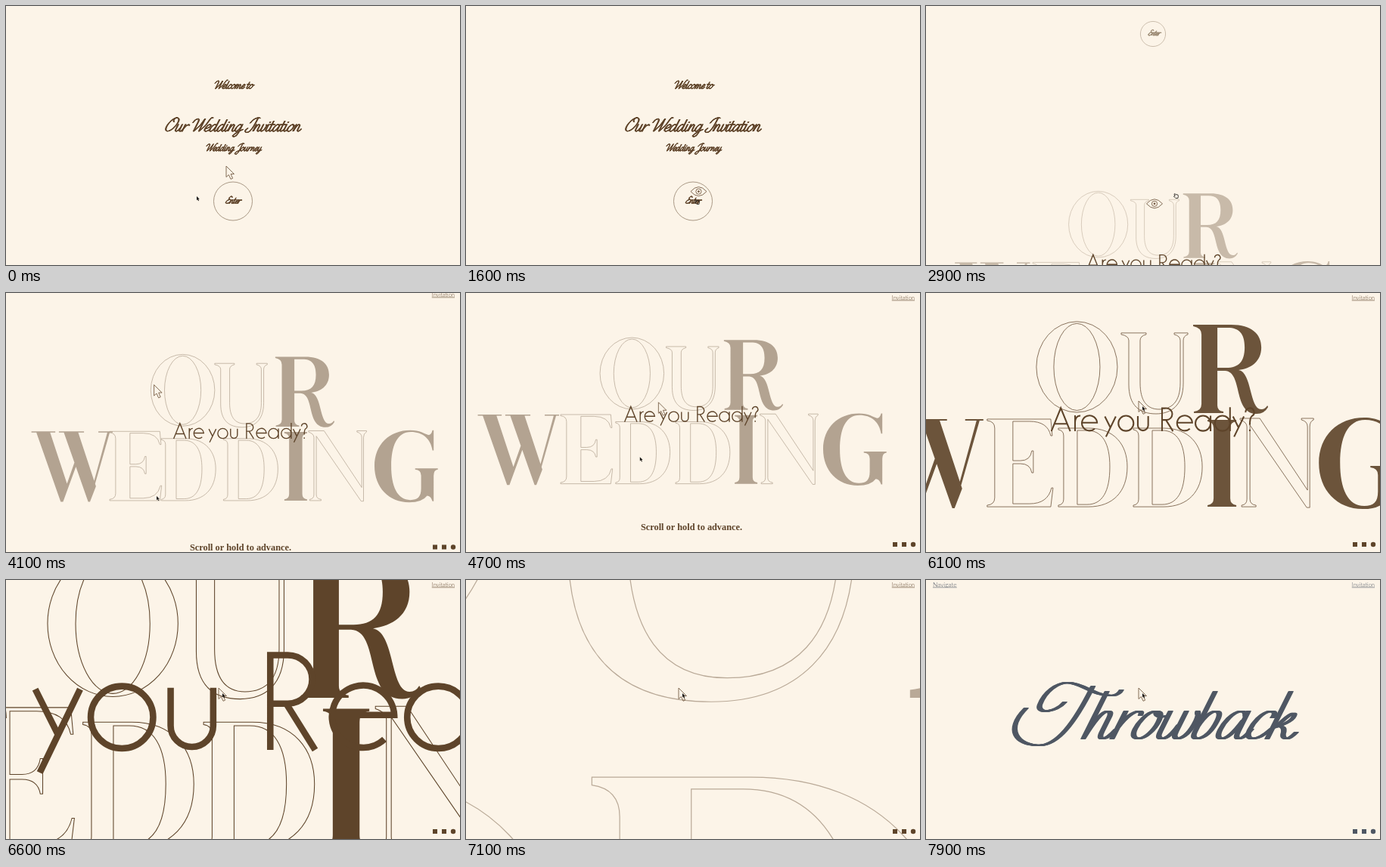
Write an HTML page with a canvas that moves like this. It is 600 px wide and 343 px high and loops after 8 s.

```html
<!DOCTYPE html>
<html lang="en">
<head>
<meta charset="utf-8">
<title>Wedding invitation</title>
<style>
html, body { margin: 0; width: 100%; height: 100%; overflow: hidden; background: #fcf4e8; }
canvas { display: block; width: 600px; height: 343px; }
</style>
</head>
<body>
<canvas id="stage" role="img" aria-label="Our Wedding Invitation"></canvas>
<script>
const LOOP = 8000;
const PAPER = [252, 244, 232], BROWN = [94, 68, 42], SLATE = [79, 87, 99], INK = [25, 22, 20];
const canvas = document.getElementById('stage'), ctx = canvas.getContext('2d');
const dpr = window.devicePixelRatio || 1;
canvas.width = 600 * dpr;
canvas.height = 343 * dpr;

// Script alphabet as upright pen strokes: advance, path. The pen and slant are added when drawn.
const hook = 'Q2 0 8 0Q14 0 20-12';
const cup = 'M2-36V-9Q2 0 9 0Q18 0 22-18';
const bowl = 'M24-30Q22-36 16-36C4-36 0-20 0-12C0-4 3 0 8 0Q18 0 24-24';
const foot = 'V-9Q25 0 31 0Q37 0 41-12';
const hump = 'V0Q6-36 16-36Q22-36 22-28V-9Q22 0 28 0Q34 0 39-12';
const round = 'C4-36 0-20 0-12C0-4 4 0 10 0Q20 0 28-13';
const pen = {
  ' ': [18, ''],
  a: [39, bowl + 'M25-36' + foot],
  b: [34, 'M2-62V-9Q2 0 10 0Q24-2 24-24Q24-36 16-36Q6-36 2-16'],
  c: [27, 'M22-28Q24-36 16-36' + round],
  d: [39, bowl + 'M25-62' + foot],
  e: [27, 'M3-14Q22-18 22-29Q22-36 15-36' + round],
  g: [38, bowl + 'M25-36V8Q24 28 12 28Q2 28 4 20Q12 4 40-10'],
  h: [38, 'M2-62' + hump],
  i: [18, 'M2-36V-9' + hook + 'M4-50v4'],
  k: [36, 'M2-62V0M2-14Q26-22 22-32Q18-38 6-16Q18-18 20-6Q22 0 28 0Q32 0 36-8'],
  l: [18, 'M2-62V-9' + hook],
  m: [52, 'M2-36V0Q6-36 14-36Q19-36 19-28V0Q23-36 31-36Q37-36 37-28V-9Q37 0 43 0Q49 0 54-12'],
  n: [37, 'M2-36' + hump],
  o: [33, 'M16-36C4-36 0-20 0-13C0-4 5 0 11 0C20 0 26-12 26-22C26-32 22-36 16-36Q20-26 34-30'],
  r: [26, 'M2-36V0M2-14Q8-36 20-36Q24-36 24-31'],
  t: [19, 'M2-54V-9' + hook + 'M-8-36H16'],
  u: [38, cup + 'M23-36V-9Q23 0 29 0Q35 0 40-12'],
  v: [27, 'M2-36V-9Q2 0 9 0Q22-2 22-26Q22-32 18-36Q20-28 30-32'],
  w: [46, cup + 'M23-36V-9Q23 0 30 0Q42-2 42-24Q42-32 38-36Q40-28 50-32'],
  y: [36, cup + 'M23-36V8Q22 28 10 28Q0 28 4 20Q12 4 38-10'],
  E: [40, 'M40-60C40-74 16-74 14-56C14-42 24-38 32-38C12-38 0-26 2-12C6 6 30 2 40-14'],
  I: [40, 'M6-44C10-66 30-76 44-70M34-70C34-30 32 6 12 6C-2 6-4-10 6-16'],
  J: [42, 'M4-44C8-66 30-74 46-70M34-70V0C34 34 10 38 6 22C4 8 30-4 44-10'],
  O: [58, 'M36-72C10-70 0-30 6-14C12 4 30 2 42-14C56-34 58-64 42-70C28-76 18-60 30-50'],
  T: [96, 'M76-69C76-20 68 9 44 9C14 9-12-12 2-40M49-48C44-34 20-32 18-45C16-62 26-74 40-74C60-74 84-56 108-57Q116-58 116-64'],
  W: [72, 'M-8-46Q-6-66 10-66Q18-66 18-52V0Q44-30 46-66V0Q72-30 74-66Q76-74 84-72']
};
for (const c in pen) pen[c][1] = new Path2D(pen[c][1]);

// Display capitals, baseline at 0
const oval = (x, y, rx, ry) => `M${x - rx} ${y}a${rx} ${ry} 0 1 1 ${2 * rx} 0a${rx} ${ry} 0 1 1 ${-2 * rx} 0Z`;
const caps = {
  O: oval(53.5, -61, 53.5, 60) + oval(53.5, -61, 30.5, 57.5),
  U: 'M0-106V-104Q10-102 10-96V-38C10-10 24 1 46 1C66 1 82-10 82-40V-96Q82-102 88-104V-106H70V-104Q78-102 78-96V-40C78-14 66-5 50-5C34-5 25-16 25-40V-96Q25-102 33-104V-106Z',
  R: 'M0-117H50C78-117 90-104 90-87C90-68 76-59 60-57C78-54 74-5 90-5Q95-5 98-10L99-8Q94 1 84 1C52 1 66-55 42-56H32V-10Q32-3 40-2V0H1V-2Q11-3 11-12V-104Q11-113 0-115ZM32-113V-60H44C60-60 68-68 68-87C68-106 60-113 46-113Z',
  W: 'M0-116H40V-114H0ZM8-115H31L61-24L53 2H49ZM51-4L77-78L80-72L53 2ZM46-116H88V-114H46ZM54-115H78L108-24L98 2H95ZM97-4L127-114H131L98 2ZM112-116H136V-114H112Z',
  E: 'M0-116H84L86-94H84Q80-113 56-113H34V-61H44Q57-61 59-74H61V-45H59Q57-57 44-57H34V-4H56Q80-4 85-25H87L84 0H0V-2Q10-3 10-12V-104Q10-113 0-114Z',
  D: 'M0-104H40C74-104 91-82 91-53C91-20 72 0 40 0H0V-2Q7-3 7-10V-94Q7-101 0-102ZM25-101V-3H38C58-3 68-20 68-53C68-84 58-101 38-101Z',
  I: 'M0-115H38V-113Q30-112 30-104V-11Q30-3 38-2V0H0V-2Q8-3 8-11V-104Q8-112 0-113Z',
  N: 'M0-117H26L89-22V-106Q89-113 81-115V-117H97V-115Q92-113 92-106V1H88L13-108V-10Q13-3 21-2V0H2V-2Q9-3 9-10V-106Q9-112 0-115Z',
  G: 'M99-84H97C94-104 80-115 61-115C38-115 28-92 28-58C28-24 38-1 60-1C72-1 78-6 78-20V-42Q78-51 68-52V-54H106V-52Q99-51 99-42V1H97Q94-8 88-8Q80 3 58 3C24 3 0-22 0-58C0-94 25-118 60-118C76-118 84-112 90-110Q95-110 97-118H99Z'
};
for (const c in caps) caps[c] = new Path2D(caps[c]);

// letter, x from centre, row, sway while settling
const title = [
  ['O', -154, 0, 3], ['U', -42, 0, -1], ['R', 53, 0, 4],
  ['W', -360, 1, 8], ['E', -219, 1, 0], ['D', -125, 1, -6], ['D', -26, 1, -2],
  ['I', 72, 1, 1], ['N', 115, 1, -1], ['G', 219, 1, 4]
];

// "Are you Ready?" in thin geometric strokes
const ring = x => oval(x, -43, 41, 41);
const sansE = x => `M${x - 41}-46h82A41 41 0 1 0 ${x + 28}-14`;
const sansY = x => `M${x}-80l29 58M${x + 59}-80l-53 110`;
const question = new Path2D(
  'M-549 0L-498-126L-447 0M-532-40H-464M-421 0V-86M-421-50Q-418-84-392-84' + sansE(-343) +
  sansY(-260) + ring(-146) + 'M-82-82V-32A28 28 0 0 0-26-32V-82' +
  'M49 0V-125H72A32 32 0 0 1 72-61H49M70-61L108 0' + sansE(171) +
  ring(270) + 'M311-84V0' + ring(375) + 'M416-130V0' + sansY(432) +
  'M500-102A23 23 0 1 1 534-82Q523-74 523-34M523-10V0');

const arrow = new Path2D('M0 0V14.5L3.4 11.5L6 17.3L8.6 16.2L6.1 10.5H10.5Z');
const hand = new Path2D('M-2-3Q-1-4 0-2.5L3-2Q4 0 3 2.5H0L-2.5 0Q-2-1-.7-.5Z');

// Linear interpolation through [time, value] pairs
function key(t, ...k) {
  if (t <= k[0][0]) return k[0][1];
  for (let i = 1; i < k.length; i++) {
    const [t0, a] = k[i - 1], [t1, b] = k[i];
    if (t < t1) return a + (b - a) * (t - t0) / (t1 - t0);
  }
  return k[k.length - 1][1];
}
const zoom = (t, ...k) => Math.exp(key(t, ...k.map(([a, v]) => [a, Math.log(v)])));
const tint = (color, a) => `rgb(${color.map((v, i) => Math.round(PAPER[i] + (v - PAPER[i]) * a))})`;

function place(x, y, s, draw) {
  ctx.save();
  ctx.translate(x, y);
  ctx.scale(s, s);
  draw();
  ctx.restore();
}

function script(text, x, y, s, color) {
  place(x, y, s, () => {
    ctx.transform(1, 0, -0.5, 1, 0, 0);
    ctx.strokeStyle = color;
    ctx.lineWidth = 2 + 0.15 / s;
    ctx.lineCap = ctx.lineJoin = 'round';
    for (const c of text) {
      const [advance, path] = pen[c];
      ctx.translate(-2.6, 0);
      for (let i = 0; i < 7; i++) {
        ctx.stroke(path);
        ctx.translate(5.2 / 6, 0);
      }
      ctx.translate(advance - 2.6 - 5.2 / 6, 0);
    }
  });
}

function label(text, x, y, font, color, align) {
  ctx.font = font;
  ctx.textAlign = align;
  ctx.fillStyle = color;
  ctx.fillText(text, x, y);
}

function link(text, x, y, size, color, align) {
  label(text, x, y, `300 ${size}px Lato, sans-serif`, color, align);
  const w = ctx.measureText(text).width;
  ctx.fillRect(align === 'right' ? x - w : x, y + 1, w, 0.6);
}

function welcome(t) {
  const a = key(t, [1750, 1], [2450, 0]);
  if (a > 0) {
    const color = tint(BROWN, a);
    script('Welcome to', 274, 109.5, 0.158, color);
    script('Our Wedding Invitation', 208, 166, 0.252, color);
    script('Wedding Journey', 263, 192, 0.14, color);
  }
  const b = key(t, [1700, 1], [2900, 0.6], [3300, 0]);
  if (b <= 0) return;
  const y = key(t, [1650, 258.5], [1800, 250], [2600, 80], [2900, 37]);
  const s = key(t, [1650, 1], [2900, 0.65]);
  ctx.strokeStyle = tint(BROWN, b * 0.65);
  ctx.lineWidth = 0.8;
  ctx.beginPath();
  ctx.arc(300, y, 25.5 * s, 0, 7);
  ctx.stroke();
  script('Enter', 300 - 10.5 * s, y + 3 * s, 0.135 * (0.4 + 0.6 * s), tint(BROWN, b));
}

function journey(t) {
  if (t < 2650 || t > 7300) return;
  const s = zoom(t, [2900, 0.73], [4100, 0.79], [5700, 0.79], [6100, 1], [6600, 1.607], [7000, 4], [7300, 9]);
  const cx = key(t, [2900, 301], [4100, 310], [4800, 296], [5300, 290], [5700, 292], [6100, 300], [6600, 303]);
  const base = key(t, [2650, 480], [2900, 334], [3200, 245], [3600, 195], [4100, 177], [4800, 151],
    [5300, 146], [5700, 148], [6100, 159], [6600, 156]);
  const gone = key(t, [6900, 1], [7250, 0]);
  const sway = key(t, [2900, 0], [4100, 1], [4900, 0]);
  const color = tint(BROWN, gone * key(t, [2650, 0.12], [2900, 0.33], [4100, 0.46], [5700, 0.46], [6100, 0.91], [6600, 1]));

  place(cx, base, s, () => {
    ctx.fillStyle = ctx.strokeStyle = color;
    ctx.lineWidth = (0.4 + 0.4 * Math.min(s, 2)) / s;
    ctx.lineJoin = 'miter';
    for (const [c, x, row, shift] of title) {
      ctx.save();
      ctx.translate(x + shift * sway / s, row * 124);
      if ('RWIG'.includes(c)) ctx.fill(caps[c]);
      else ctx.stroke(caps[c]);
      ctx.restore();
    }
  });

  const size = zoom(t, [5700, 0.161], [6100, 0.244], [6600, 1], [7100, 14]);
  const drop = key(t, [5700, 16], [6100, 24], [6600, 68], [7100, 600]);
  place(cx - key(t, [6100, 0], [6600, 3]), base + drop, size, () => {
    ctx.strokeStyle = tint(BROWN, gone);
    ctx.lineWidth = 8.5;
    ctx.lineCap = 'butt';
    ctx.lineJoin = 'miter';
    ctx.stroke(question);
  });

  const hint = key(t, [5650, 1], [5950, 0]);
  if (hint > 0) label('Scroll or hold to advance.', cx, 304 + (base - 146) * 1.2,
    'bold 12.3px "Liberation Serif", serif', tint(BROWN, hint), 'center');
}

function frameLinks(t) {
  const ink = t < 7200 ? BROWN : SLATE;
  const hide = key(t, [3900, 1], [4300, 0]);
  link('Invitation', 593, 8.6 - 8 * hide, 7.5, tint(ink, 1), 'right');
  ctx.fillStyle = tint(ink, 1);
  const y = 333 + 7 * hide + (hide === 1 ? 20 : 0);
  ctx.fillRect(564, y - 3, 6, 6);
  ctx.fillRect(576, y - 3, 6, 6);
  ctx.beginPath();
  ctx.arc(591, y, 3.2, 0, 7);
  ctx.fill();
  if (t > 7150) link('Navigate', 9, key(t, [7150, -4], [7450, 8.6]), 8.4, tint(SLATE, 1), 'left');
}

function pointers(t) {
  const parked = t < 100 ? [252, 252] : t < 700 ? [275, 272] : null;
  const [x, y] = parked || [
    key(t, [900, 366], [1600, 305], [2600, 312], [2900, 330], [4100, 199], [4900, 240], [5200, 287], [6100, 286]),
    key(t, [900, 162], [1600, 260], [2600, 262], [2900, 252], [4100, 269], [4900, 200], [5200, 151], [6100, 150])
  ];
  const [bx, by] = t < 100 ? [291, 212] : t < 700 ? [280, 262] : [
    key(t, [900, 360], [1700, 300], [2900, 302], [3300, 298], [4100, 195.5], [5300, 313], [5700, 281]),
    key(t, [900, 158], [1700, 258], [2900, 262], [3300, 200], [4100, 121.5], [5300, 168], [5700, 143])
  ];
  const over = t > 1600 && t < 3050;
  place(bx, by, 1, () => {
    ctx.strokeStyle = tint(BROWN, 0.85);
    ctx.lineWidth = 0.9;
    ctx.lineJoin = 'miter';
    if (!over) return ctx.stroke(arrow);
    ctx.stroke(new Path2D('M-10.5 0Q0-12 10.5 0Q0 12-10.5 0Z' + oval(0, 0, 3.6, 3.6)));
    ctx.fillStyle = ctx.strokeStyle;
    ctx.fill(new Path2D(oval(0, 0, 1.4, 1.4)));
  });
  place(x, y, over ? 1 : 0.36, () => {
    ctx.fillStyle = ctx.strokeStyle = tint(INK, 1);
    ctx.lineWidth = 0.8;
    if (over) ctx.stroke(hand);
    else ctx.fill(arrow);
  });
}

function draw(t) {
  ctx.setTransform(dpr, 0, 0, dpr, 0, 0);
  ctx.fillStyle = tint(PAPER, 1);
  ctx.fillRect(0, 0, 600, 343);
  if (t < 3300) welcome(t);
  journey(t);
  const a = key(t, [7150, 0], [7650, 1]);
  if (a > 0) script('Throwback', 110, 210, 1, tint(SLATE, a));
  if (t > 3900) frameLinks(t);
  pointers(t);
}

const start = performance.now();
function tick() {
  draw((performance.now() - start) % LOOP);
  requestAnimationFrame(tick);
}
tick();
</script>
</body>
</html>
```
